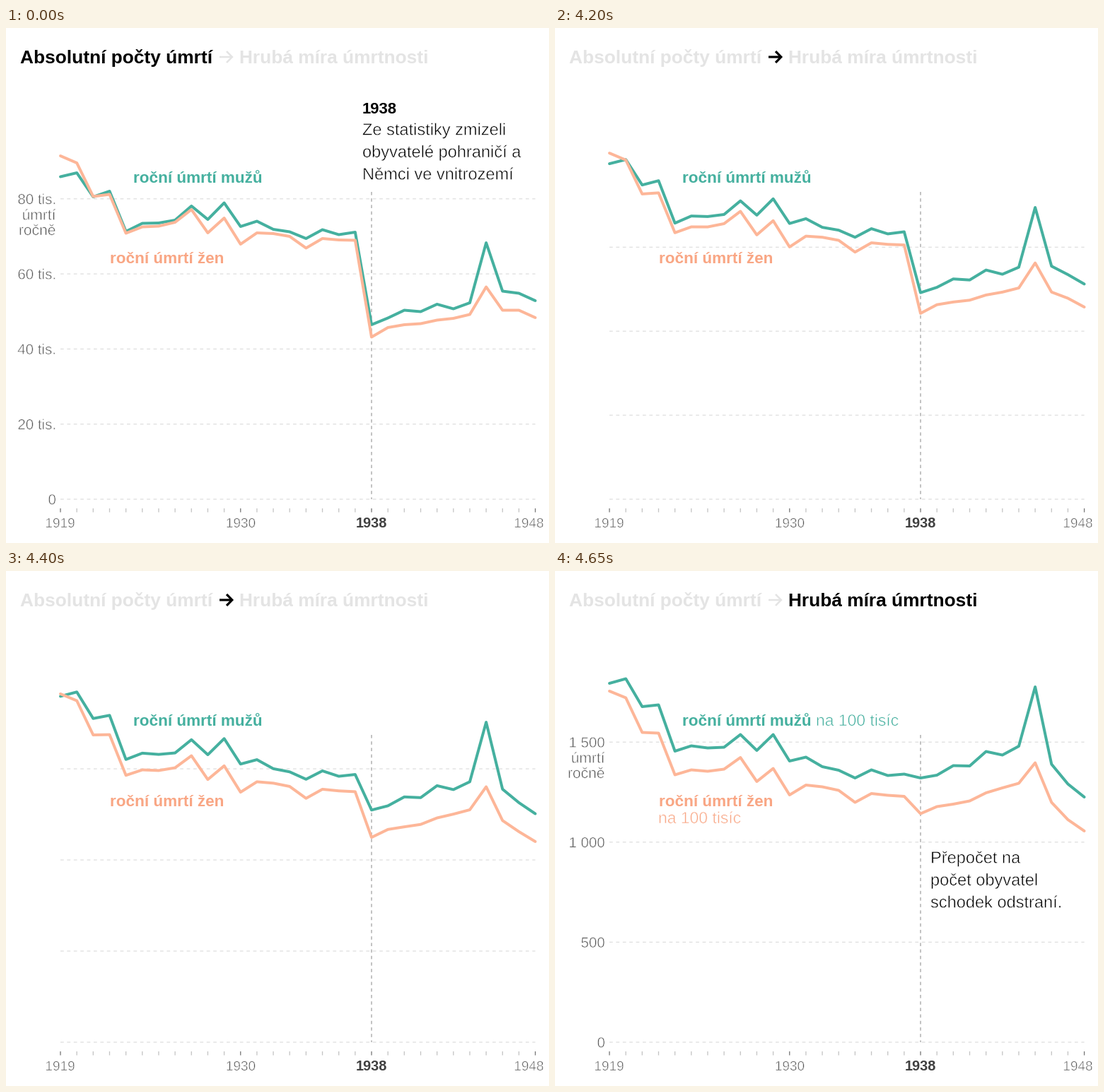
A matplotlib script for the animation above (8.65 s loop, 768x729 px).

```python
import matplotlib.pyplot as plt
import numpy as np
from matplotlib.animation import FuncAnimation
from matplotlib.patheffects import Stroke

W, H, DPI = 768, 729, 96
PX = 72 / DPI                      # points per pixel
HOLD, STEPS, INTERVAL = 80, 14, 50
FRAMES = 2 * HOLD + STEPS - 1

TEAL, PEACH, PEACH_TEXT = "#45b09f", "#fdb698", "#f9a684"
FADED, GRID, GUIDE = "#e4e4e4", "#dddddd", "#b4b4b4"
LABEL, DARK = "#555555", "#404040"
LEFT, RIGHT, BASE = 77, 748.6, 667
YEARS = np.arange(1919, 1949)

plt.rcParams["font.family"] = "Liberation Sans"
plt.rcParams["lines.scale_dashes"] = False

# Heights on the stage, one value per year: deaths, then deaths per 100,000.
MEN_COUNT = np.array([
    210.5, 205, 239, 231, 288, 276.5, 276, 272, 252, 271,
    247.5, 281, 273.5, 285, 288.5, 298, 285.5, 292.5, 289, 420,
    410.5, 399.5, 401.5, 391, 397.5, 389, 304, 372.5, 375.5, 386])
MEN_RATE = np.array([
    159, 152.5, 192, 189.5, 255, 247.5, 250.5, 249.5, 231.5, 254,
    231.5, 269, 263.5, 277, 282, 293, 281.5, 289.5, 287.5, 293,
    289, 275.5, 276, 255.5, 260.5, 248, 164, 273.5, 301.5, 320])
WOMEN_COUNT = np.array([
    181, 191, 238.5, 235.5, 290.5, 281.5, 280.5, 275, 257, 290,
    269, 306, 290, 291, 295, 311.5, 298, 300, 300.5, 437.5,
    424, 420, 418.5, 413.5, 411, 405.5, 366.5, 399.5, 399.5, 410])
WOMEN_RATE = np.array([
    170, 179.5, 228.5, 229.5, 288.5, 281.5, 283.5, 280.5, 264, 298,
    279.5, 317, 303, 305.5, 310.5, 327.5, 315, 317.5, 319, 343.5,
    333.5, 330, 325.5, 314, 307, 300.5, 271.5, 327.5, 352, 368])

GRID_COUNT = BASE - 106.3 * np.arange(5)
GRID_RATE = BASE - 141.6 * np.arange(4)

fig = plt.figure(figsize=(W / DPI, H / DPI), dpi=DPI, facecolor="white")
ax = fig.add_axes([0, 0, 1, 1])
ax.set(xlim=(0, W), ylim=(H, 0))
ax.axis("off")


def year_x(year):
    return LEFT + (year - 1919) * (RIGHT - LEFT) / 29


def text(x, y, s, size, color="black", bold=False, ha="left"):
    t = ax.text(x, y, s, size=size * PX, color=color, ha=ha, va="baseline",
                weight="bold" if bold else "normal", zorder=6)
    if not bold:                   # trim the outline for a light weight
        t.set_path_effects([Stroke(linewidth=0.6 * PX, foreground="white")])
    return t


def line(x, y, color, width, **kw):
    return ax.plot(x, y, color=color, lw=width * PX, snap=False, **kw)[0]


def dashed(x, y, color, width, dash, **kw):
    return line(x, y, color, width, dashes=(dash * PX, dash * PX),
                dash_capstyle="butt", **kw)


def curve(y, color, z):
    return line(year_x(YEARS), y, color, 4, zorder=z,
                solid_capstyle="round", solid_joinstyle="round")


def block(x, y, rows, step=31.5):
    return [text(x, y + i * step, row, 23.6) for i, row in enumerate(rows)]


def axis_labels(values, heights):
    labels = [text(71, y + 7.4, s, 20.5, LABEL, ha="right")
              for s, y in zip(values, heights)]
    unit = [text(70.5, y, s, 21, LABEL, ha="right")
            for s, y in (("úmrtí", 271.5), ("ročně", 293))]
    return labels + unit


title_count = text(20, 49.5, "Absolutní počty úmrtí", 26.3, bold=True)
title_rate = text(330, 49.5, "Hrubá míra úmrtnosti", 26.3, bold=True)
arrow = [line(x, y, FADED, 2.5, solid_capstyle="butt", solid_joinstyle="miter")
         for x, y in (([302, 319.5], [41, 41]),
                      ([312, 319.8, 312], [33, 41, 49]))]

grid = [dashed([LEFT, RIGHT], [y, y], GRID, 1.2, 4.7, zorder=1)
        for y in GRID_COUNT]
for year in YEARS:
    major = year in (1919, 1930, 1938, 1948)
    line([year_x(year)] * 2, [680, 685.5], "#777777" if major else "#c4c4c4",
         1.3, solid_capstyle="butt")
for x, year in ((76.5, 1919), (332, 1930), (739.5, 1948)):
    text(x, 707, str(year), 19, LABEL, ha="center")
text(517, 707, "1938", 20, DARK, bold=True, ha="center")

men = curve(MEN_COUNT, TEAL, 3)
women = curve(WOMEN_COUNT, PEACH, 4)
dashed([year_x(1938)] * 2, [232, BASE], GUIDE, 1.6, 4.6, zorder=2.5)
text(180, 219, "roční úmrtí mužů", 22.45, TEAL, bold=True)
text(147, 332.5, "roční úmrtí žen", 22.45, PEACH_TEXT, bold=True)

count_only = axis_labels(["0", "20 tis.", "40 tis.", "60 tis.", "80 tis."],
                         GRID_COUNT)
count_only += block(504, 151.5, ["Ze statistiky zmizeli",
                                 "obyvatelé pohraničí a",
                                 "Němci ve vnitrozemí"])
count_only += [text(504, 121, "1938", 22, bold=True), grid[4]]

rate_only = axis_labels(["0", "500", "1 000", "1 500"], GRID_RATE)
rate_only += block(531, 413.5, ["Přepočet na", "počet obyvatel",
                                "schodek odstraní."])
rate_only += [text(369, 219, "na 100 tisíc", 22.9, TEAL),
              text(146, 357, "na 100 tisíc", 22.9, PEACH_TEXT)]


def mix(a, b, p):
    return a + (b - a) * p


def update(i):
    p = min(max((i - HOLD + 1) / STEPS, 0), 1)
    moving = 0 < p < 1
    men.set_ydata(mix(MEN_COUNT, MEN_RATE, p))
    women.set_ydata(mix(WOMEN_COUNT, WOMEN_RATE, p))
    for rule, a, b in zip(grid, GRID_COUNT, GRID_RATE):
        rule.set_ydata([mix(a, b, p)] * 2)
    for artist in count_only:
        artist.set_visible(p == 0)
    for artist in rate_only:
        artist.set_visible(p == 1)
    title_count.set_color("black" if p == 0 else FADED)
    title_rate.set_color("black" if p == 1 else FADED)
    for part in arrow:
        part.set_color("black" if moving else FADED)
        part.set_linewidth((3.2 if moving else 2.5) * PX)
    return []


anim = FuncAnimation(fig, update, frames=FRAMES, interval=INTERVAL,
                     init_func=lambda: update(0), repeat=True, repeat_delay=0)
plt.show()
```
